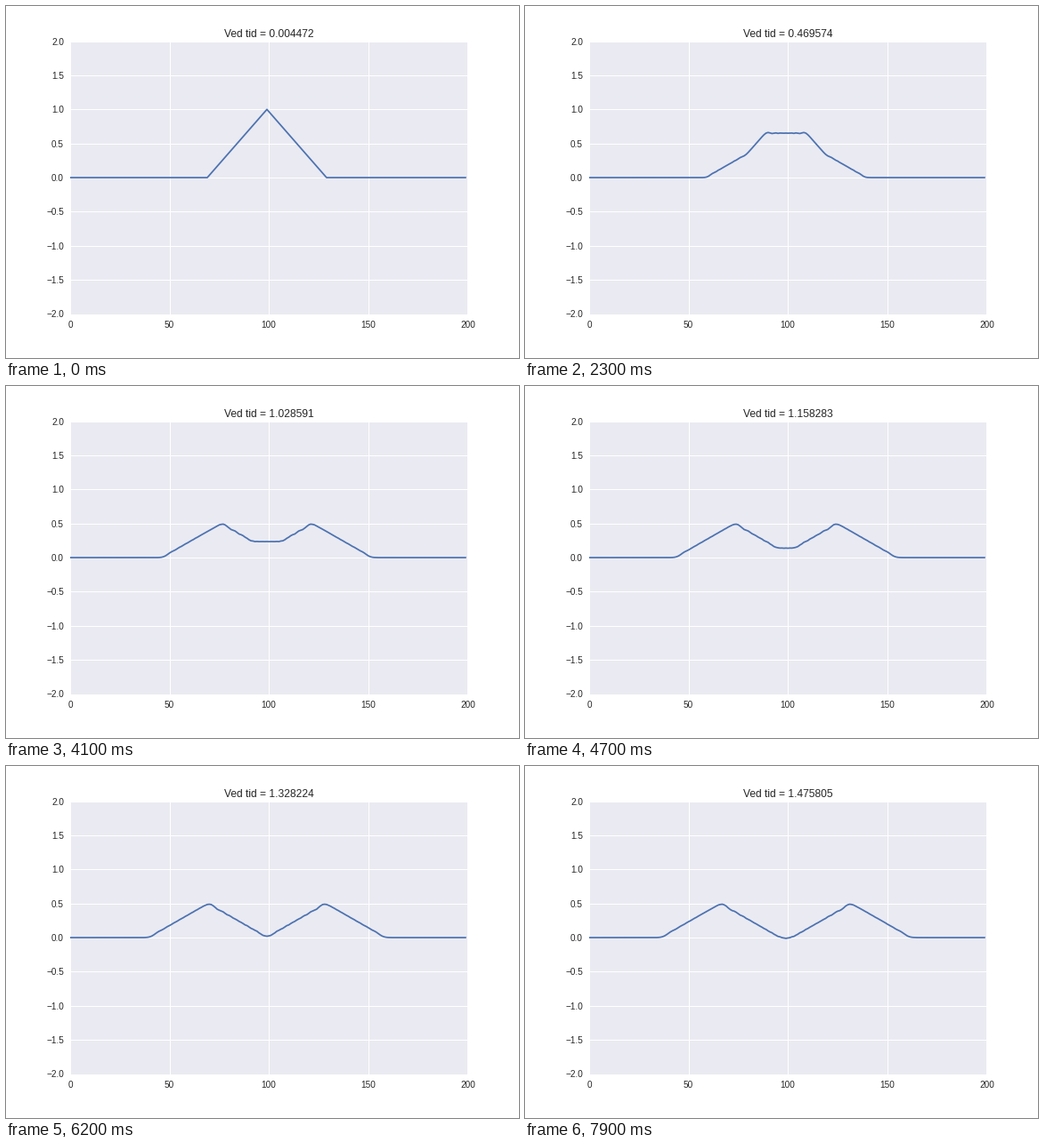
Animation of 576 by 396 pixels, one loop 8 s. Source, as a matplotlib script:

```python
import numpy as np
import matplotlib.pyplot as plt
from matplotlib.animation import FuncAnimation

FRAMES, INTERVAL = 80, 100
N = 200                  # masses on the string
MASS, STIFFNESS = 0.02, 10.0
DT = 0.1 * np.sqrt(MASS / STIFFNESS)

INK, PANEL, BLUE = "#262626", "#EAEAF2", "#4C72B0"

plt.rcParams.update({
    "font.family": "Liberation Sans",
    "font.size": 10,
    "text.color": INK,
    "axes.unicode_minus": True,
})


def simulate(steps):
    """Beaded string with fixed ends, released at rest from a triangle."""
    x = np.arange(N)
    start = np.clip(1 - np.abs(x - 99) / 30, 0, None)
    y = [start, start]
    for _ in range(steps - 1):
        force = np.zeros(N)
        force[1:-1] = STIFFNESS * np.diff(y[-1], 2)
        y.append(2 * y[-1] - y[-2] + force * DT**2 / MASS)
    return x, y


# The playback speed varies: (frame, time step) knots
KNOTS = [(0, 1), (9, 55), (23, 105), (34, 185),
         (45, 255), (47, 259), (62, 297), (79, 330)]
STEPS = np.rint(np.interp(np.arange(FRAMES), *zip(*KNOTS))).astype(int)

x, waves = simulate(STEPS[-1])

fig = plt.figure(figsize=(8, 5.5), dpi=72, facecolor="white")
ax = fig.add_axes([0.125, 0.125, 0.775, 0.775], facecolor=PANEL)
ax.set(xlim=(0, 200), ylim=(-2, 2),
       xticks=np.arange(0, 201, 50), yticks=np.arange(-2, 2.1, 0.5))
ax.set_axisbelow(True)
ax.grid(color="white", linewidth=1, linestyle="-")
ax.tick_params(length=0, pad=7, labelsize=10, labelcolor=INK)
for spine in ax.spines.values():
    spine.set_visible(False)

line, = ax.plot(x, waves[0], color=BLUE, linewidth=1.75,
                solid_capstyle="round")
title = ax.set_title("", fontsize=12, y=1.0, pad=5)


def update(frame):
    step = STEPS[frame]
    line.set_ydata(waves[step])
    title.set_text(f"Ved tid = {step * DT:.6f}")
    return line, title


anim = FuncAnimation(fig, update, frames=FRAMES, interval=INTERVAL,
                     repeat=True, repeat_delay=0, blit=False)
plt.show()
```
